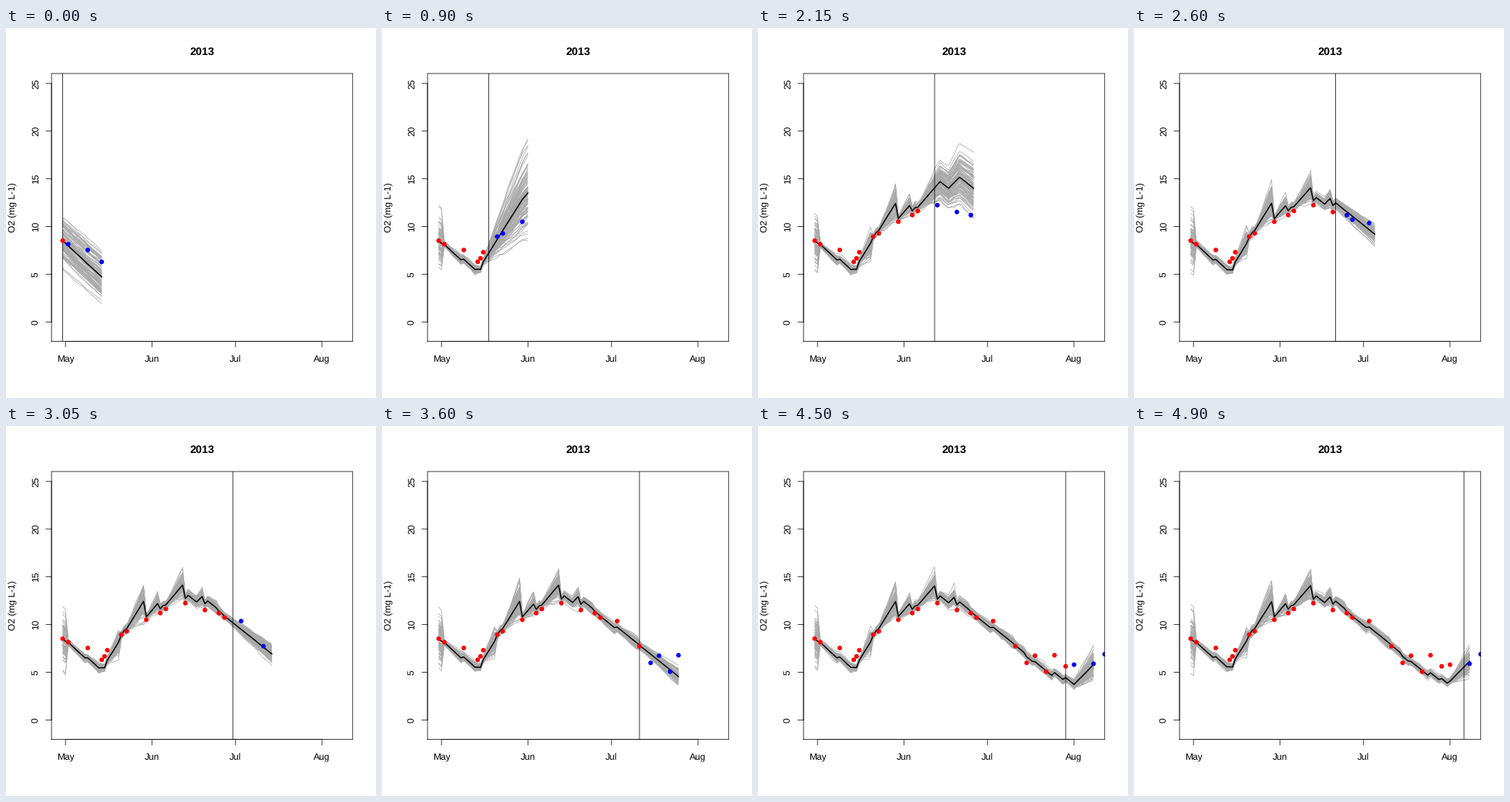
These frames come from a looping animation (480 by 480 pixels, 4.95 s). A matplotlib script:

```python
import numpy as np
import matplotlib.pyplot as plt
from matplotlib.animation import FuncAnimation
from matplotlib.collections import LineCollection
from matplotlib.lines import Line2D

SIZE = 480
LEFT, RIGHT, BOTTOM, TOP = 59.04, 449.76, 73.44, 420.96
FRAMES, INTERVAL = 99, 50
LAST_DAY, HORIZON, MEMBERS = 100, 14, 100
OBS_VAR = .16
HAIR = dict(color="black", lw=.75, snap=False)

# Measured oxygen: day since 30 April -> mg/L
OBS = {0: 8.52, 2: 8.15, 9: 7.54, 14: 6.3, 15: 6.67, 16: 7.31, 21: 8.94,
       23: 9.28, 30: 10.5, 35: 11.2, 37: 11.63, 44: 12.24, 51: 11.52,
       56: 11.19, 58: 10.73, 64: 10.36, 72: 7.73, 76: 5.98, 79: 6.73,
       83: 5.06, 86: 6.78, 90: 5.62, 93: 5.79, 100: 5.89, 104: 6.89}

# Daily change of the model, from the given day on
TREND = {0: -.27, 15: .47, 30: .34, 45: -.23, 48: .29, 52: -.235, 93: .3}


def trend(day):
    return TREND[max(start for start in TREND if start <= day)]


def standard(rng):
    """Normal sample with exactly zero mean and unit deviation."""
    z = rng.normal(size=MEMBERS)
    return (z - z.mean()) / z.std()


def ensemble(today):
    """Members by day, pulled to each observation made up to today."""
    rng = np.random.default_rng(today)
    x = OBS[0] + 1.2 * standard(rng)
    rate = standard(rng)
    path = [x]
    for day in range(1, min(today + HORIZON, LAST_DAY) + 1):
        step = trend(day - 1)
        spread = .02 + .25 * max(step, 0)
        noise = rng.normal(0, .05 + .4 * spread, MEMBERS)
        x = x + step + spread * rate + noise
        if day in OBS and day <= today:
            gain = x.var() / (x.var() + OBS_VAR)
            x = x + gain * (OBS[day] - x)
            rate = standard(rng)
        path.append(x)
    return np.array(path).T


plt.rcParams["font.family"] = "Liberation Sans"
plt.rcParams["text.hinting"] = "none"
fig = plt.figure(figsize=(SIZE / 72, SIZE / 72), dpi=72, facecolor="white")
ax = fig.add_axes([LEFT / SIZE, BOTTOM / SIZE,
                   (RIGHT - LEFT) / SIZE, (TOP - BOTTOM) / SIZE])
ax.set_xlim(-4, 104)
ax.set_ylim(-2.04, 26.04)
ax.set_axis_off()


def px(day):
    return LEFT + (day + 4) / 108 * (RIGHT - LEFT)


def py(value):
    return BOTTOM + (value + 2.04) / 28.08 * (TOP - BOTTOM)


def stroke(xs, ys):
    fig.add_artist(Line2D(np.array(xs) / SIZE, np.array(ys) / SIZE, **HAIR))


def label(x, y, text, size=12, **style):
    fig.text(x / SIZE, y / SIZE, text, fontsize=size, ha="center",
             va="baseline", rotation_mode="anchor", **style)


stroke([LEFT, RIGHT, RIGHT, LEFT, LEFT], [BOTTOM, BOTTOM, TOP, TOP, BOTTOM])
stroke([px(1), px(93)], [BOTTOM, BOTTOM])
stroke([LEFT, LEFT], [py(0), py(25)])
for name, day in {"May": 1, "Jun": 32, "Jul": 62, "Aug": 93}.items():
    stroke([px(day)] * 2, [BOTTOM, BOTTOM - 7.2])
    label(px(day), 47.2, name)
for v in range(0, 26, 5):
    stroke([LEFT, LEFT - 7.2], [py(v)] * 2)
    label(41.8, py(v), str(v), rotation=90)
label(13, (BOTTOM + TOP) / 2, "O2 (mg L-1)", rotation=90)
label((LEFT + RIGHT) / 2, 445, "2013", 14.4, weight="bold")

members = LineCollection([], colors="darkgrey", linewidths=.75, zorder=2)
ax.add_collection(members, autolim=False)
mean_line, = ax.plot([], [], color="black", lw=1.5, zorder=3)
now_line = ax.axvline(0, zorder=4, **HAIR)
dots = ax.scatter([], [], s=36, linewidths=0, zorder=5)


def draw(today):
    paths = ensemble(today)
    days = np.arange(paths.shape[1])
    members.set_segments([np.column_stack([days, p]) for p in paths])
    mean_line.set_data(days, paths.mean(axis=0))
    now_line.set_xdata([today, today])
    seen = [d for d in OBS if d <= today + HORIZON]
    dots.set_offsets([(d, OBS[d]) for d in seen])
    dots.set_facecolor(["red" if d <= today else "blue" for d in seen])
    return members, mean_line, now_line, dots


anim = FuncAnimation(fig, draw, frames=FRAMES, interval=INTERVAL,
                     repeat=True, repeat_delay=0)
plt.show()
```
